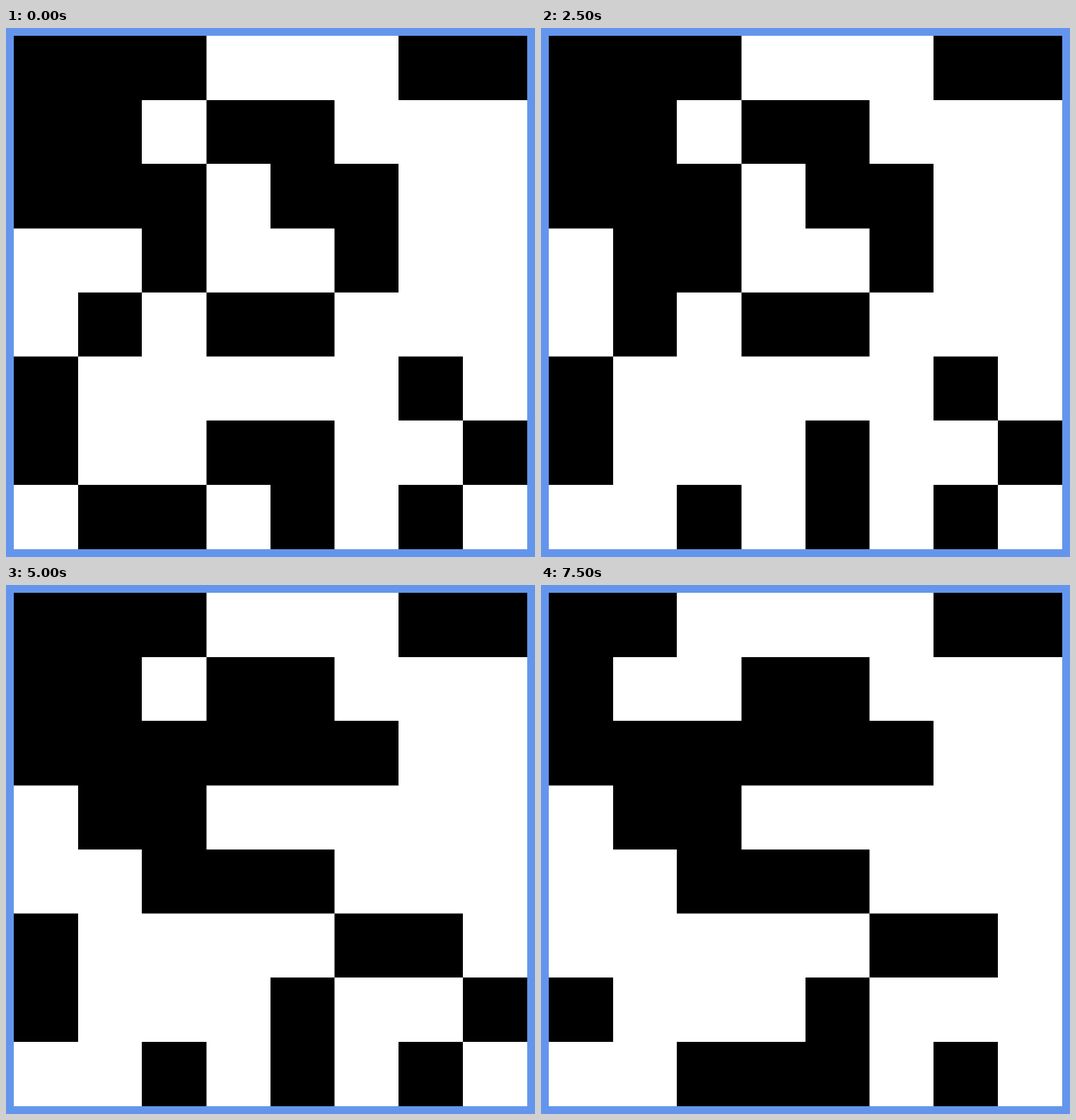
These frames come from a looping animation (748x748 px, 8000 ms). An HTML page with a canvas:

```html
<!DOCTYPE html>
<html lang="en">
<head>
<meta charset="utf-8">
<title>Flipping cells</title>
<style>
  html, body { margin: 0; width: 100%; height: 100%; overflow: hidden; background: #6495ed; }
  canvas { display: block; }
</style>
</head>
<body>
<canvas id="stage" width="748" height="748"></canvas>
<script>
const ctx = document.getElementById('stage').getContext('2d');
const STEP = 500;
const EDGES = [11, 102, 192, 283.5, 374, 464.5, 555, 646, 737];
const START = [
  '###...##',
  '##.##...',
  '###.##..',
  '..#..#..',
  '.#.##...',
  '#.....#.',
  '#..##..#',
  '.##.#.#.'
];
// One cell flips per step, written as column then row.
const FLIPS = '17 13 36 37 37 32 24 53 14 55 76 11 37 20 05'.split(' ');
const LOOP = (FLIPS.length + 1) * STEP;

function gridAt(step) {
  const grid = START.map(row => [...row].map(c => c === '#'));
  for (const [col, row] of FLIPS.slice(0, step)) grid[row][col] = !grid[row][col];
  return grid;
}

function draw(step) {
  const first = EDGES[0], size = EDGES[8] - first;
  ctx.fillStyle = '#6495ed';
  ctx.fillRect(0, 0, 748, 748);
  ctx.fillStyle = '#fff';
  ctx.fillRect(first, first, size, size);

  // A single path keeps neighbouring cells free of seams.
  ctx.fillStyle = '#000';
  ctx.beginPath();
  gridAt(step).forEach((cells, r) => cells.forEach((on, c) => {
    if (on) ctx.rect(EDGES[c], EDGES[r], EDGES[c + 1] - EDGES[c], EDGES[r + 1] - EDGES[r]);
  }));
  ctx.fill();
}

function tick(now) {
  draw(Math.floor((now % LOOP) / STEP));
  requestAnimationFrame(tick);
}

draw(0);
requestAnimationFrame(tick);
</script>
</body>
</html>
```
